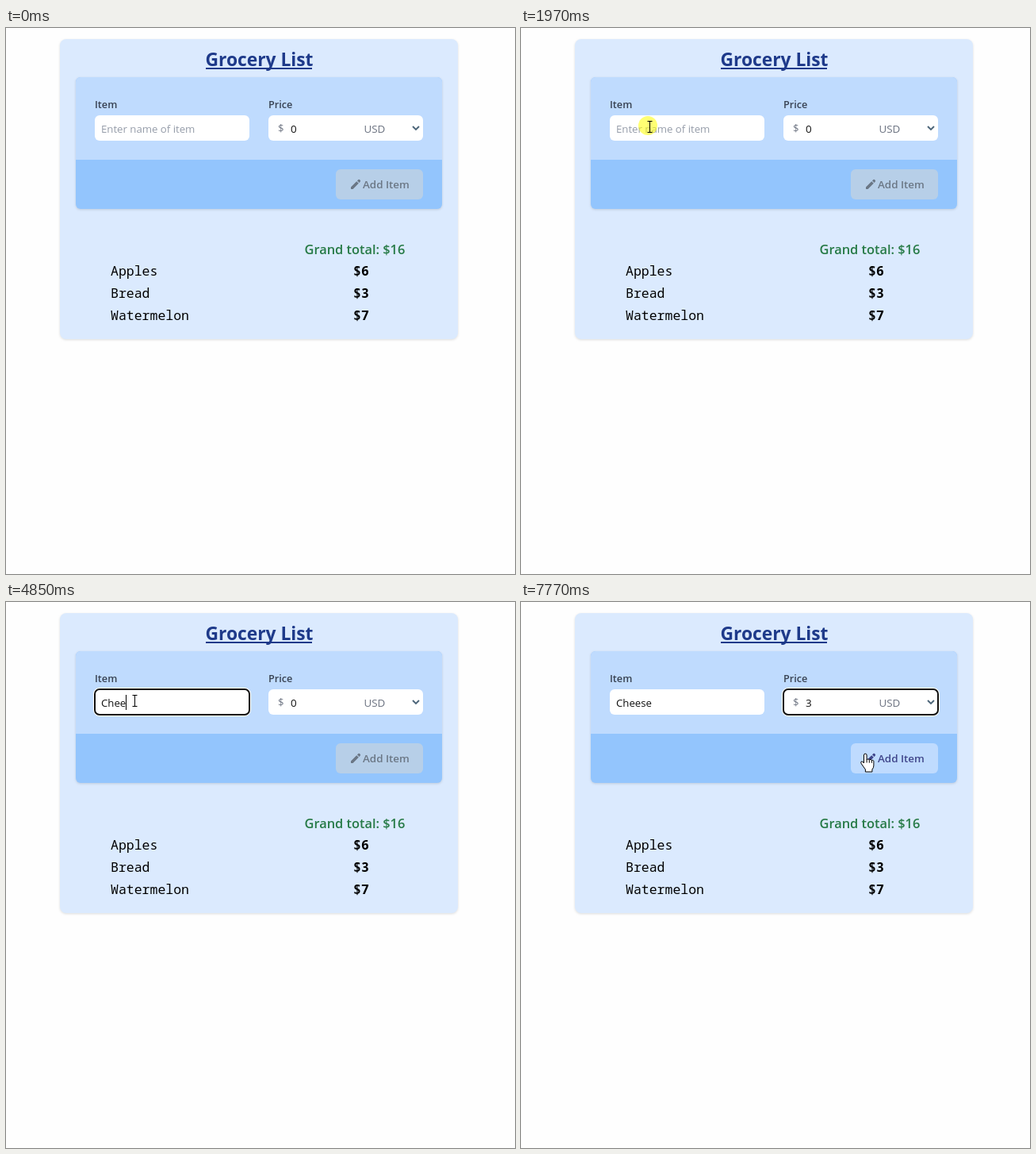
Recreate the animation shown at these times as an HTML page. Size 642 by 688 pixels, loop 8 s.

```html
<!DOCTYPE html>
<html lang="en">
<head>
<meta charset="utf-8">
<title>Grocery List</title>
<style>
  html, body { margin: 0; width: 100%; height: 100%; overflow: hidden; background: #fefefe; }
  svg { display: block; width: 642px; height: 688px; font: 13.2px "Open Sans", "Noto Sans", sans-serif; }
  .card { filter: drop-shadow(0 1px 1.5px #0002); }
  .label { font-size: 12.7px; font-weight: 600; fill: #374151; }
  .muted { fill: #6b7280; }
  .list { font: 16.5px "Noto Sans Mono", monospace; }
  .price { font-weight: 700; }
  .pointer { fill: #fff; stroke: #000; stroke-linejoin: round; }
</style>
</head>
<body>
<svg viewBox="0 0 642 688">
  <rect class="card" x="68" y="14" width="502" height="378" rx="8" fill="#dbeafe"/>
  <text x="251.5" y="48" font-size="22.8" font-weight="700" fill="#1e3a8a">Grocery List</text>
  <rect x="252" y="50" width="134" height="2" fill="#1e3a8a"/>

  <g class="card">
    <rect x="88" y="62" width="462" height="166" rx="6" fill="#93c5fd"/>
    <path d="M88 166V68a6 6 0 0 1 6-6H544a6 6 0 0 1 6 6V166z" fill="#bfdbfe"/>
  </g>
  <text class="label" x="112" y="101">Item</text>
  <text class="label" x="331" y="101">Price</text>
  <rect x="112" y="110" width="195" height="32" rx="6" fill="#fff"/>
  <rect x="331" y="110" width="195" height="32" rx="6" fill="#fff"/>
  <g id="ring" fill="none">
    <rect width="195" height="32" rx="6" stroke="#fff" stroke-width="4"/>
    <rect width="195" height="32" rx="6" stroke="#101010" stroke-width="2"/>
  </g>
  <text id="item" x="120" y="132"></text>
  <text class="muted" x="343" y="131">$</text>
  <rect id="selection" x="359" y="117" width="8" height="19" fill="#3390ff"/>
  <text id="price" x="359" y="132" font-size="13.4"></text>
  <text class="muted" x="451.5" y="132" font-size="13.4">USD</text>
  <path d="M513 124l4 4 4-4" fill="none" stroke="#4b6478" stroke-width="1.9"/>
  <rect id="caret" y="117" width="1" height="19"/>

  <rect id="button" x="416" y="178" width="110" height="38" rx="6"/>
  <g id="caption">
    <path d="M435 203v-2.6l7.2-7.2 2.6 2.6-7.2 7.2zM443 192.4l.9-.9a1.8 1.8 0 0 1 2.6 2.6l-.9.9z"/>
    <text x="450" y="202" font-size="13.4" font-weight="600">Add Item</text>
  </g>

  <text x="376.5" y="285" font-size="16.4" font-weight="600" fill="#267a46">Grand total: $16</text>
  <g id="list" class="list"></g>

  <circle id="click" cx="160" cy="123" r="12" fill="#ff0" opacity=".55"/>
  <g id="cursor">
    <path id="arrow" class="pointer" d="M.5.5v16l3.7-3.5 2.7 6 2.3-1-2.6-5.9h5z"/>
    <path id="beam" d="M-2.5-6.5h6M.5-6.5v14M-2.5 7.5h6" fill="none" stroke="#000"/>
    <g id="hand" class="pointer">
      <path d="M-1.5 12V2a1.8 1.8 0 0 1 3.6 0V8a1.7 1.7 0 0 1 3.2.2a1.6 1.6 0 0 1 3 .6a1.5 1.5 0 0 1 2.6 1V15q0 3-2 5v3H.4v-3l-5-7q-1.5-2 0-3q1.5-.6 3.1 2z"/>
      <path d="M2.1 8v3.5M5.3 8.2v3.5M8.3 8.8v3" fill="none"/>
    </g>
  </g>
</svg>
<script>
const LOOP = 8000;
const SAMPLE = 50;  // the pointer is sampled, so it moves in steps
const BLINK = 505;
const FOCUS_ITEM = 2010, FOCUS_PRICE = 5710, TYPE_PRICE = 7030, ENABLE = 7080;
const keyTimes = [3890, 3990, 4190, 4850, 5000, 5200];
const inputTimes = [FOCUS_ITEM, ...keyTimes, TYPE_PRICE];

const glides = [
  { start: 390, duration: 250, from: [683, 767], to: [153, 239], power: [2, 2] },
  { start: 840, duration: 500, from: [153, 239], to: [162, 124], power: [1, 5] },
  { start: 7570, duration: 250, from: [162, 124], to: [434, 191], power: [2, 2] }
];

const byId = id => document.getElementById(id);
const set = (id, name, value) => byId(id).setAttribute(name, value);
const show = (id, visible) => set(id, 'display', visible ? 'inline' : 'none');
const within = (v, from, to) => v >= from && v < to;
const easeOut = (p, power) => 1 - (1 - p) ** power;
const put = (id, text, color) => {
  byId(id).textContent = text;
  set(id, 'fill', color);
};

Object.entries({ Apples: 6, Bread: 3, Watermelon: 7 }).forEach(([name, price], i) => {
  const y = 312 + 28 * i;
  byId('list').innerHTML +=
    `<text x="132" y="${y}">${name}</text><text class="price" x="438" y="${y}">$${price}</text>`;
});

function drawForm(t) {
  const typed = 'Cheese'.slice(0, keyTimes.filter(k => k <= t).length);
  put('item', typed || 'Enter name of item', typed ? '#111' : '#959ca9');

  const onPrice = t >= FOCUS_PRICE;
  const selected = within(t, FOCUS_PRICE, TYPE_PRICE);
  put('price', t < TYPE_PRICE ? '0' : '3', selected ? '#fff' : '#111');
  show('selection', selected);

  show('ring', t >= FOCUS_ITEM);
  set('ring', 'transform', `translate(${onPrice ? 331 : 112} 110)`);

  // Every input restarts the caret's blinking
  const lastInput = inputTimes.findLast(time => time <= t);
  const lit = Math.floor((t - lastInput) / BLINK) % 2 === 0;
  const typedWidth = typed ? byId('item').getComputedTextLength() : 0;
  set('caret', 'x', onPrice ? 366 : Math.round(120 + typedWidth));
  show('caret', lit && !selected);
}

function pointerAt(t) {
  const glide = glides.findLast(g => g.start <= t);
  if (!glide) return null;
  const { start, duration, from, to, power } = glide;
  const steps = Math.floor((t - start) / SAMPLE) + 1;
  const progress = Math.min(1, steps * SAMPLE / duration);
  return from.map((v, i) => v + (to[i] - v) * easeOut(progress, power[i]));
}

function drawPointer(point) {
  show('cursor', point);
  if (!point) return false;
  const [x, y] = point.map(Math.round);
  const overField = within(x, 112, 307) && within(y, 110, 142);
  const overButton = within(x, 416, 526) && within(y, 178, 216);
  show('beam', overField);
  show('hand', overButton);
  show('arrow', !overField && !overButton);
  set('cursor', 'transform', `translate(${x} ${y})`);
  return overButton;
}

function drawButton(enabled, hovered) {
  set('button', 'fill', !enabled ? '#b7cfe8' : hovered ? '#bfdbfe' : '#dbeafe');
  set('caption', 'fill', enabled ? '#3f458a' : '#6b7785');
}

function render(now) {
  const t = now % LOOP;
  drawForm(t);
  show('click', within(t, 1970, 2070));
  const hovered = drawPointer(pointerAt(t));
  drawButton(t >= ENABLE, hovered);
  requestAnimationFrame(render);
}
render(0);
</script>
</body>
</html>
```
